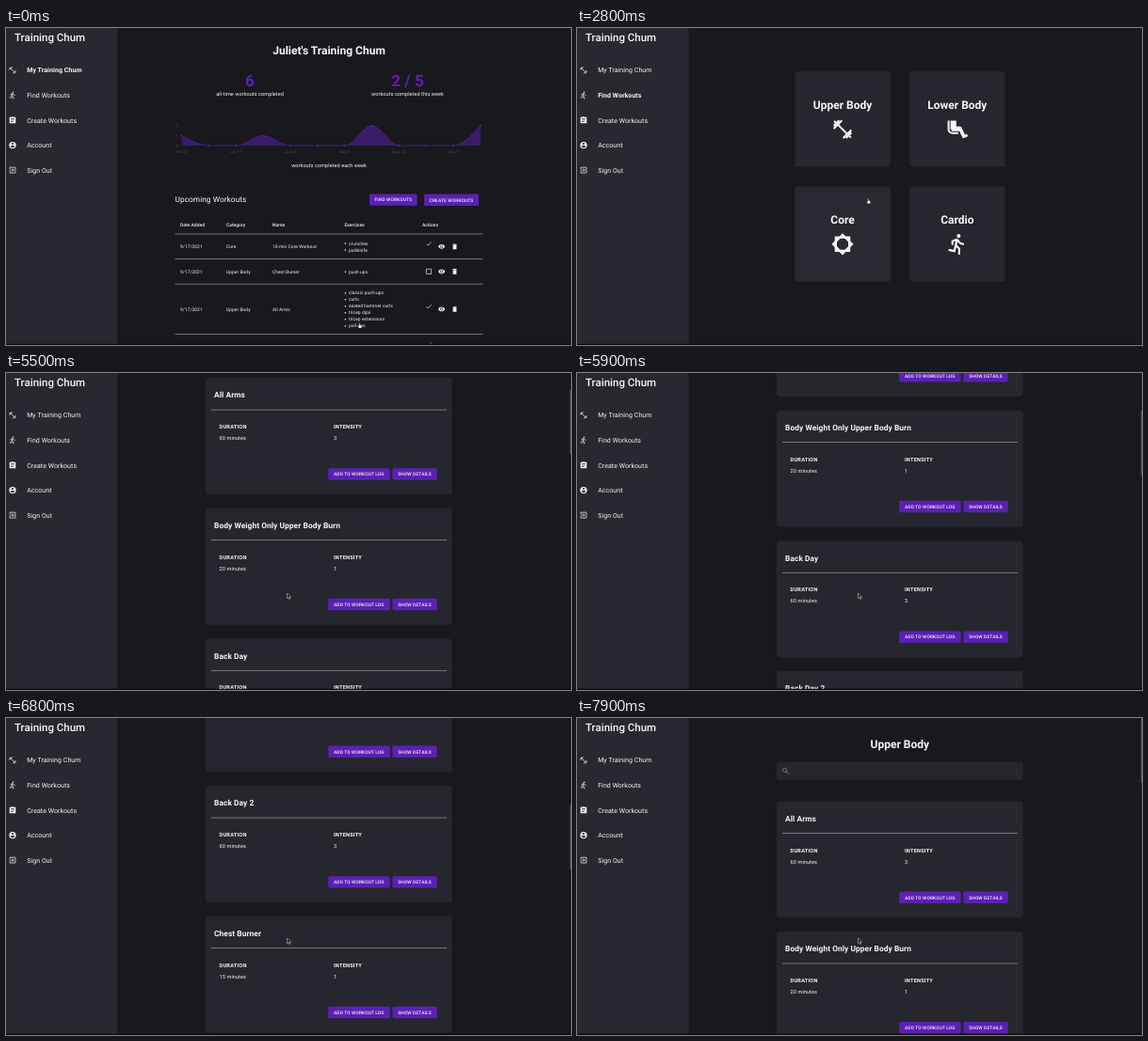
These frames come from a looping animation (600x337 px, 8 s). An HTML page:

```html
<!DOCTYPE html>
<html lang="en">
<head>
<meta charset="utf-8">
<title>Workout dashboard</title>
<style>
  html, body { margin: 0; width: 100%; height: 100%; overflow: hidden; background: #19181c; }
  svg { display: block; width: 100%; height: 100%; }
  text {
    font-family: Roboto, sans-serif; letter-spacing: .0094em;
    white-space: pre; text-rendering: geometricPrecision;
  }
</style>
</head>
<body>
<svg id="stage" viewBox="0 0 600 337"></svg>
<script>
const DURATION = 8000, STEP = 100;
const WHITE = '#f6f6f7', PANEL = '#26262e', HOVER = '#292932';
const PURPLE = '#5b20b4', PRESSED = '#40167e', RULE = '#98989c';

const stage = document.getElementById('stage');

function add(parent, tag, attrs = {}) {
  const node = document.createElementNS('http://www.w3.org/2000/svg', tag);
  for (const key in attrs) node.setAttribute(key, attrs[key]);
  return parent.appendChild(node);
}
const group = (parent = stage) => add(parent, 'g');
const rect = (parent, x, y, width, height, fill, rx = 0) =>
  add(parent, 'rect', { x, y, width, height, fill, rx });
const rule = (parent, x, y, width) => rect(parent, x, y, width, .7, RULE);

// y is the middle of the capitals
function text(parent, x, y, string, size, attrs = {}) {
  const node = add(parent, 'text', { x, y: y + size * .36, 'font-size': size, fill: WHITE, ...attrs });
  node.textContent = string;
  return node;
}
const BOLD = { 'font-weight': 700 };
const MEDIUM = { 'font-weight': 500 };
const MIDDLE = { 'text-anchor': 'middle' };
const HEADING = { ...BOLD, ...MIDDLE, style: 'letter-spacing:0' };

// Icons on a 24 unit grid: strokes as [path, width], fills as [path]
const disc = (x, y, r) => `M${x - r} ${y}a${r} ${r} 0 1 0 ${2 * r} 0a${r} ${r} 0 1 0 ${-2 * r} 0z`;
const block = (x, y, w, h) => `M${x} ${y}h${w}v${h}h${-w}z`;
const diamond = 'M12 2.2L21.8 12 12 21.8 2.2 12z';
const plates = [[5, 6], [3, 4], [.8, 1.1]].map(([x, h]) =>
  [`M${x} ${12 - h}v${2 * h}M${24 - x} ${12 - h}v${2 * h}`, 2.1]);
const ICONS = {
  dumbbell: [['M5 12H19', 2], ...plates],
  runner: [[disc(13.5, 3.5, 2)], ['M7 13V9L11.5 7', 2], ['M12 7Q14.5 12 19 12', 2],
    ['M11.8 6.8L9 19.2 3 18', 2.1], ['M10.3 13L14 16.6V23', 2]],
  clipboard: [[block(3, 3, 18, 18) + block(7, 7, 10, 2) + block(7, 11, 10, 2) + block(7, 15, 7, 2)], [disc(12, 3.5, 2.3)]],
  account: [[disc(12, 12, 10) + disc(12, 8, 3) + 'M6 16c0-4 12-4 12 0-3 4.3-9 4.3-12 0z']],
  exit: [['M4 9V4H20V20H4V15', 2], ['M3 12H15M11 7.5L15.5 12 11 16.5', 2]],
  legs: [['M3 3V12A4 4 0 0 0 7 16H13', 2], ['M8 3V12', 6], ['M6 11.5H15.5', 5],
    ['M14.5 10L19.4 20.5', 3.6], ['M18.2 20L22.6 18', 2.6]],
  sun: [[block(5, 5, 14, 14), 2.2], [diamond, 2.2]],
  check: [['M4 12.5L9 17.5 20.3 6.3', 2]],
  box: [[block(4, 4, 16, 16), 2]],
  eye: [['M1 12C5 2 19 2 23 12 19 22 5 22 1 12z' + disc(12, 12, 5) + disc(12, 12, 3)]],
  bin: [[block(6, 7, 12, 14) + block(5, 4, 14, 2) + block(9, 3, 6, 1)]],
  search: [[disc(9.5, 9.5, 5.5), 2], ['M13.5 13.5L20 20', 2.2]]
};

function icon(parent, name, cx, cy, size, color = WHITE) {
  const turn = name === 'dumbbell' ? 45 : 0;
  const holder = add(parent, 'g', {
    transform: `translate(${cx} ${cy}) rotate(${turn}) scale(${size / 24}) translate(-12 -12)`
  });
  for (const [d, width] of ICONS[name]) {
    add(holder, 'path', width
      ? { d, fill: 'none', stroke: color, 'stroke-width': width }
      : { d, fill: color, 'fill-rule': 'evenodd' });
  }
}

function button(parent, x, y, width, label) {
  const face = rect(parent, x, y, width, 12.4, PURPLE, 1.6);
  text(parent, x + width / 2, y + 6.3, label, 4.85,
    { ...MIDDLE, ...MEDIUM, style: 'letter-spacing:.0286em' });
  return face;
}

function buildChart(parent) {
  const values = [1, 0, 0, 1, 0, 0, 0, 2, 0, 0, 0, 2];
  const gap = 28.85, left = 186.5, base = 125, last = values.length - 1;
  const px = i => left + gap * i, py = v => base - v * 10.6;
  let line = `M${left} ${py(values[0])}`;
  for (let i = 1; i <= last; i++) {
    const from = py(values[i - 1]), to = py(values[i]), lean = (to - from) / 2;
    const c1 = i === 1 ? from + lean : from;
    const c2 = i === last ? to - lean : to;
    line += `C${px(i - 1) + gap / 3} ${c1} ${px(i) - gap / 3} ${c2} ${px(i)} ${to}`;
  }
  add(parent, 'path', { d: `${line}V${base}H${left}Z`, fill: PURPLE, opacity: .5 });
  add(parent, 'path', { d: line, fill: 'none', stroke: PURPLE, 'stroke-width': .6 });
  values.forEach((v, i) => add(parent, 'circle', { cx: px(i), cy: py(v), r: 1, fill: PURPLE }));
  const dim = { fill: '#48484d' };
  for (let v = 0; v < 3; v++) text(parent, 183, py(v), v, 4.5, { ...dim, 'text-anchor': 'end' });
  ['Jun 27', 'Jul 11', 'Jul 25', 'Aug 8', 'Aug 22', 'Sep 5'].forEach((day, i) =>
    text(parent, px(2 * i), 131.3, day, 4.5, { ...dim, ...MIDDLE }));
}

function buildDashboard() {
  const page = group();
  text(page, 343, 24, "Juliet's Training Chum", 12, HEADING);
  for (const [x, count, label] of [[259, '6', 'all-time workouts completed'], [426.5, '2 / 5', 'workouts completed this week']]) {
    text(page, x, 56.2, count, 17, { ...HEADING, fill: PURPLE });
    text(page, x, 70, label, 5.57, MIDDLE);
  }
  buildChart(page);
  text(page, 343, 146, 'workouts completed each week', 5.57, MIDDLE);
  text(page, 179.5, 182, 'Upcoming Workouts', 8.25);
  const find = button(page, 386, 176.4, 50.6, 'FIND WORKOUTS');
  button(page, 444, 176.6, 58, 'CREATE WORKOUTS');

  const columns = [185, 234, 283, 359.5, 442];
  ['Date Added', 'Category', 'Name', 'Exercises', 'Actions'].forEach((label, i) =>
    text(page, columns[i], 209, label, 4.9, MEDIUM));
  rule(page, 179.5, 218.6, 327);

  const rows = [
    ['Core', '10-min Core Workout', 'check', ['crunches', 'jackknife']],
    ['Upper Body', 'Chest Burner', 'box', ['push ups']],
    ['Upper Body', 'All Arms', 'check',
      ['classic push-ups', 'curls', 'seated hammer curls', 'tricep dips', 'tricep extensions', 'pull-ups']]
  ];
  let top = 219;
  for (const [kind, name, mark, moves] of rows) {
    const height = Math.max(26.6, 11.5 + 7 * moves.length), y = top + height / 2;
    ['9/17/2021', kind, name].forEach((s, i) => text(page, columns[i], y, s, 4.9));
    moves.forEach((move, i) => {
      const lineY = y + (i - (moves.length - 1) / 2) * 7;
      add(page, 'circle', { cx: 360.4, cy: lineY + .3, r: .8, fill: WHITE });
      text(page, 364, lineY, move, 4.9);
    });
    icon(page, mark, 449, mark === 'check' ? y - 2.8 : y, 7.8);
    icon(page, 'eye', 462.6, y, 7.6);
    icon(page, 'bin', 476.5, y, 7.6);
    top += height;
    rule(page, 179.5, top - .4, 327);
  }
  icon(page, 'check', 449, top + 11, 7.8);
  return { page, find };
}

function buildMenu() {
  const page = group();
  const cards = [['Upper Body', 'dumbbell'], ['Lower Body', 'legs'], ['Core', 'sun'], ['Cardio', 'runner']]
    .map(([label, name], i) => {
      const x = 231.5 + 121.8 * (i % 2), y = 46.3 + 122.1 * Math.floor(i / 2);
      const face = rect(page, x, y, 101.2, 101.2, PANEL, 2);
      text(page, x + 50.5, y + 35.6, label, 12, HEADING);
      icon(page, name, x + 50.5, y + 61.4, 24.5);
      return { x, y, face };
    });
  return { page, cards };
}

function buildList() {
  const page = group(), content = group(page);
  text(content, 342.8, 27.4, 'Upper Body', 12, HEADING);
  rect(content, 212, 46.8, 261.6, 19, PANEL, 3);
  icon(content, 'search', 221.6, 56.4, 9, '#8d8d93');
  [['All Arms', 60, 3], ['Body Weight Only Upper Body Burn', 20, 1], ['Back Day', 60, 3],
   ['Back Day 2', 60, 3], ['Chest Burner', 15, 1], ['Chest Day', 60, 3]
  ].forEach(([name, minutes, intensity], i) => {
    const y = 88.5 + 138.6 * i;
    rect(content, 212, y, 261.6, 124, PANEL, 4);
    text(content, 221, y + 18.2, name, 8.35, BOLD);
    rule(content, 218, y + 33.5, 250);
    [[226.6, 'DURATION', `${minutes} minutes`], [348, 'INTENSITY', intensity]].forEach(([x, label, value]) => {
      text(content, x, y + 52, label, 5.6, { ...BOLD, style: 'letter-spacing:.04em' });
      text(content, x, y + 64, value, 5.6);
    });
    button(content, 342.2, y + 96, 65.4, 'ADD TO WORKOUT LOG');
    button(content, 410.4, y + 96, 47.3, 'SHOW DETAILS');
  });
  const thumb = rect(page, 598.8, 0, 1.2, 69, '#505054', .6);
  return { page, content, thumb };
}

function buildSidebar() {
  rect(stage, 0, 0, 118.5, 337, '#282830');
  text(stage, 9, 10.2, 'Training Chum', 11.5, { ...MEDIUM, style: 'letter-spacing:0' });
  return [['dumbbell', 'My Training Chum'], ['runner', 'Find Workouts'], ['clipboard', 'Create Workouts'],
    ['account', 'Account'], ['exit', 'Sign Out']
  ].map(([name, label], i) => {
    const y = 44.9 + 26.55 * i;
    icon(stage, name, 7, y, 8.8);
    return text(stage, 22.2, y, label, 7);
  });
}

const dashboard = buildDashboard(), menu = buildMenu(), list = buildList();
const links = buildSidebar();
rect(stage, 0, 335.8, 600, 1.2, '#060607');
const arrow = add(stage, 'path', {
  d: 'M0 0V5.6L1.3 4.5 2.2 6.5 3 6.1 2.2 4.2H4Z', fill: '#111', stroke: '#ddd', 'stroke-width': .55
});
const hand = add(stage, 'path', {
  d: 'M-.5 0H.5V2.2L2.5 2.8 2.2 5.6H-.4L-2 3.6-.5 3.4Z',
  fill: '#fff', stroke: '#222', 'stroke-width': .4
});

const progress = (t, from, to) => Math.min(1, Math.max(0, (t - from) / (to - from)));
const easeOut = p => 1 - (1 - p) ** 2;
const easeInOut = p => p * p * (3 - 2 * p);

// Each move goes from one time to another, to x and y, with a sideways bow
const MOVES = [
  { from: 0, to: 900, x: 411, y: 181, bow: 88 },
  { from: 2100, to: 2500, x: 340, y: 155 },
  { from: 2600, to: 3000, x: 299, y: 190 },
  { from: 3200, to: 3600, x: 291, y: 99 },
  { from: 4800, to: 5100, x: 298.6, y: 234 }
];
function pointerAt(t) {
  let x = 375.3, y = 313.5;
  for (const move of MOVES) {
    const p = easeOut(progress(t, move.from, move.to));
    x += (move.x - x) * p + (move.bow || 0) * Math.sin(Math.PI * p);
    y += (move.y - y) * p;
  }
  return [x, y];
}

// Two flicks down, then back to the top
function scrollAt(t) {
  const flick = (start, distance) => distance * easeOut(progress(t, start, start + 900));
  return (flick(5300, 210.7) + flick(6225, 254.6)) * (1 - easeInOut(progress(t, 7300, 7900)));
}

const inside = (px, py, x, y, w, h) => px >= x && px <= x + w && py >= y && py <= y + h;
const show = (node, on) => node.setAttribute('display', on ? 'inline' : 'none');

function draw(t) {
  const [x, y] = pointerAt(t), offset = scrollAt(t);
  const current = t < 1000 ? 0 : t < 4300 ? 1 : 2;
  [dashboard, menu, list].forEach((view, i) => show(view.page, i === current));
  links.forEach((link, i) => link.setAttribute('font-weight', i === current && i < 2 ? 700 : 400));

  dashboard.find.setAttribute('fill', inside(x, y, 386, 176, 51, 13) ? PRESSED : PURPLE);
  let overCard = false;
  for (const card of menu.cards) {
    const over = inside(x, y, card.x, card.y, 101.2, 101.2);
    card.face.setAttribute('fill', over ? HOVER : PANEL);
    overCard = overCard || over;
  }
  list.content.setAttribute('transform', `translate(0 ${-offset})`);
  list.thumb.setAttribute('y', offset * .2125);
  show(list.thumb, t >= 5400);

  const pointing = current === 0 || (current === 1 && overCard);
  show(hand, pointing);
  show(arrow, !pointing);
  for (const node of [hand, arrow]) node.setAttribute('transform', `translate(${x} ${y})`);
}

const start = performance.now();
function tick() {
  const t = (performance.now() - start) % DURATION;
  draw(Math.floor(t / STEP) * STEP);
  requestAnimationFrame(tick);
}
tick();
</script>
</body>
</html>
```
